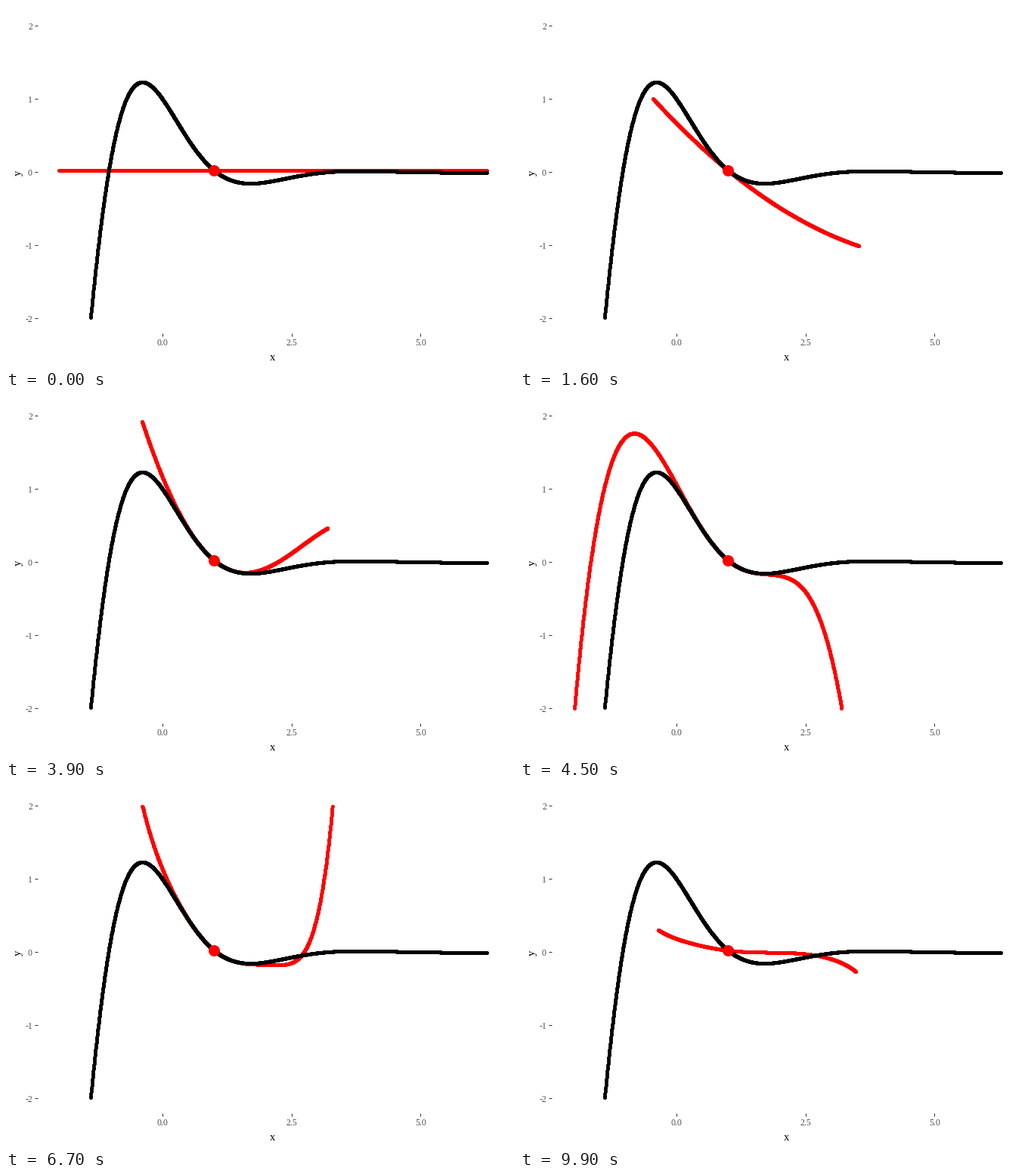
A matplotlib script that plays this animation: 672 by 480 pixels, repeating every 10 s.

```python
from math import factorial, pi

import matplotlib.pyplot as plt
import numpy as np
from matplotlib.animation import FuncAnimation

W, H, DPI = 672, 480, 96
FRAMES, INTERVAL = 100, 100
LEFT, RIGHT, TOP, BOTTOM = 42.1, 664.2, 6.9, 433.9  # panel edges in pixels

# Moves between successive polynomial degrees: first frame and number of steps.
STARTS = [4, 16, 28, 39, 50, 61, 72, 83, 94]
STEPS = [8, 8, 7, 7, 7, 7, 7, 7, 7]
DEGREES = len(STARTS)

plt.rcParams.update({
    "font.family": "Liberation Serif",
    "axes.unicode_minus": False,
})

# f(x) = exp(-x) cos(1.5 x) is the real part of exp(C x).
C = -1 + 1.5j
CENTER = 1.0


def f(x, order=0):
    """Derivative of the given order."""
    return (C**order * np.exp(C * x)).real


def expansion(x, degree):
    # Derivatives above the fourth are taken at zero, not at the centre.
    return sum(f(CENTER if n < 5 else 0, n) / factorial(n) * (x - CENTER)**n
               for n in range(degree + 1))


def in_range(y):
    """Hide points that leave the plotted range."""
    return np.where(np.abs(y) <= 2, y, np.nan)


x = np.arange(-2, 2 * pi, 0.004)
states = [in_range(expansion(x, n)) for n in range(DEGREES)]


def curve_at(frame):
    """Linear blend of two states; points missing in either one stay hidden."""
    current = states[0]
    for i, (start, steps) in enumerate(zip(STARTS, STEPS)):
        if frame < start:
            break
        after = states[(i + 1) % DEGREES]
        t = (frame - start + 1) / steps
        current = after if t >= 1 else (1 - t) * states[i] + t * after
    return current


fig = plt.figure(figsize=(W / DPI, H / DPI), dpi=DPI, facecolor="white")
ax = fig.add_axes([LEFT / W, 1 - BOTTOM / H, (RIGHT - LEFT) / W, (BOTTOM - TOP) / H])
pad = 0.05 * (2 * pi + 2)
ax.set_xlim(-2 - pad, 2 * pi + pad)
ax.set_ylim(-2.2, 2.2)
ax.spines[:].set_visible(False)
ax.set_xticks([0, 2.5, 5], ["0.0", "2.5", "5.0"])
ax.set_yticks(range(-2, 3), [str(v) for v in range(-2, 3)])
ax.tick_params(length=2.75, width=0.75, pad=2.6, color="#333333",
               labelcolor="#4d4d4d", labelsize=8.8)

fig.text(352.5 / W, 1 - 470 / H, "x", size=11, ha="center", va="baseline")
fig.text(16.5 / W, 1 - 221 / H, "y", size=11, rotation=90, ha="center", va="center")


def dots(xs, ys, color, px):
    return ax.plot(xs, ys, "o", color=color, ms=px * 72 / DPI, mew=0,
                   antialiased=False)[0]


approx = dots(x, states[0], "red", 5)
dots(x, in_range(f(x)), "black", 5)
dots([CENTER], [f(CENTER)], "red", 15)


def update(frame):
    approx.set_ydata(curve_at(frame))
    return [approx]


anim = FuncAnimation(fig, update, frames=FRAMES, interval=INTERVAL,
                     repeat=True, repeat_delay=0, blit=False)
plt.show()
```
